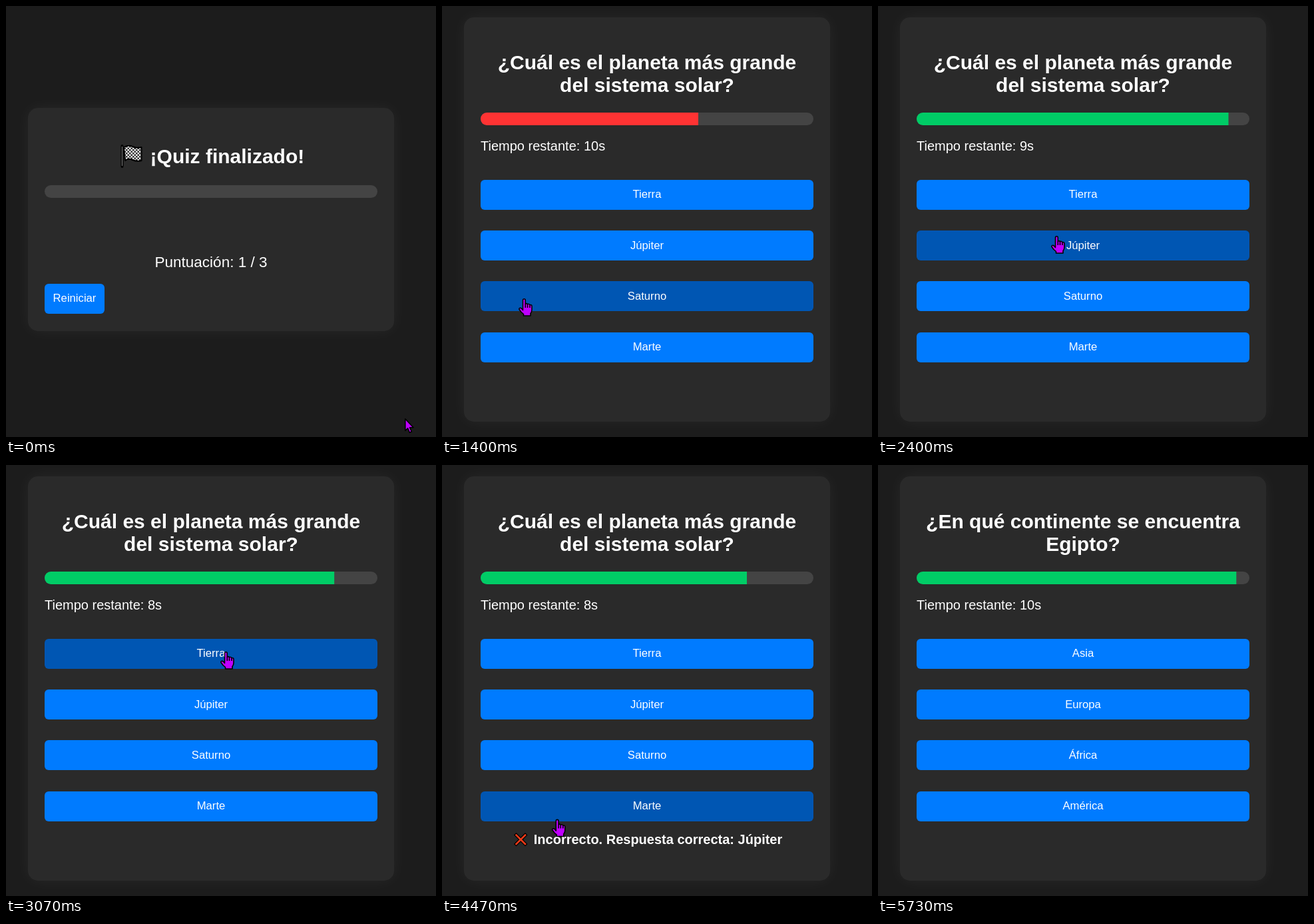
Recreate the animation shown at these times as an HTML page. Size 646x647 px, loop 5800 ms.

```html
<!DOCTYPE html>
<html lang="es">
<head>
<meta charset="utf-8">
<title>Quiz</title>
<style>
  html, body { margin: 0; width: 100%; height: 100%; overflow: hidden; background: #1c1c1c; }
  #card {
    position: absolute; left: 33px; width: 550px; border-radius: 15px;
    background: #2a2a2a; box-shadow: 0 0 25px rgba(255, 255, 255, .05);
  }
  svg { position: absolute; left: 0; top: 0; }
  text { font-family: "Liberation Sans", Arial, sans-serif; fill: #fff; }
  .mid { text-anchor: middle; }
  .title { font-size: 30px; font-weight: bold; }
  .label { font-size: 16.667px; text-anchor: middle; }
  .note { font-size: 20px; }
  .pointer { fill: #bf00ff; stroke: #000; stroke-width: 1.6; stroke-linejoin: round; }
</style>
</head>
<body>
<div id="card"></div>
<svg width="646" height="647" viewBox="0 0 646 647">
  <defs>
    <pattern id="checks" width="5" height="5" patternUnits="userSpaceOnUse">
      <rect width="5" height="5" fill="#f0f0f0"/>
      <path d="M0 0h2.5v5h2.5v-2.5h-5z" fill="#333"/>
    </pattern>
    <clipPath id="pill"><rect x="58" width="500" height="19" rx="9.5"/></clipPath>
  </defs>

  <g id="bar" clip-path="url(#pill)">
    <rect x="58" width="500" height="19" fill="#444"/>
    <rect id="fill" x="58" height="19"/>
  </g>

  <g id="end">
    <path d="M174.5 210V241" stroke="#000" stroke-width="4" stroke-linecap="round"/>
    <path d="M174.5 211V240" stroke="#777" stroke-width="1.2"/>
    <path d="M177 212Q184 208 190 211T203.500 212V232Q197 234 190 231T179 232Z"
      fill="url(#checks)" stroke="#000" stroke-width="2" stroke-linejoin="round"/>
    <text class="title" x="216.600" y="236">¡Quiz finalizado!</text>
    <text class="mid" x="308" y="392" font-size="22.5">Puntuación: 1 / 3</text>
  </g>

  <g id="quiz">
    <text id="line0" class="title mid" x="308" y="95"></text>
    <text id="line1" class="title mid" x="308" y="129"></text>
    <text id="time" class="note" x="58" y="217"></text>
  </g>

  <g id="buttons"></g>

  <g id="feedback">
    <g fill="none" stroke-linecap="square">
      <path d="M111.500 555.500L125 569M125 555.500L111.500 569" stroke="#000" stroke-width="5"/>
      <path d="M111.500 555.500L125 569M125 555.500L111.500 569" stroke="#f03a17" stroke-width="2.600"/>
    </g>
    <text class="note" x="137.800" y="569" font-weight="bold">Incorrecto. Respuesta correcta: Júpiter</text>
  </g>

  <g id="cursor" class="pointer">
    <path id="arrow" d="M.8 .8V18.500L4.600 14.800L7.300 21.300L10.300 20L7.600 13.700H13Z"/>
    <g id="hand">
      <path d="M-1.500 17.500V2.500Q-1.500 .8 .4 .8Q2.300 .8 2.300 2.500V8Q4 7 5.500 8.500Q7.500 7.700 9 9.500Q12 9 12 12V17Q12 20 10 22.500V26H-.5V23.500L-4 20.500L-7 16.500Q-7.500 14 -5 14.200Q-3 15 -1.500 17.500Z"/>
      <path d="M2.300 8V14M5.500 8.500V14M9 9.500V14" fill="none"/>
    </g>
  </g>
</svg>

<script>
const LOOP = 5800, FPS = 15;
const RESTART = 746, ANSWER = 3430, NEXT = 4930;
const $ = id => document.getElementById(id);
const smooth = u => u * u * (3 - 2 * u);

const questions = [
  { lines: ['¿Cuál es el planeta más grande', 'del sistema solar?'],
    options: ['Tierra', 'Júpiter', 'Saturno', 'Marte'] },
  { lines: ['¿En qué continente se encuentra', 'Egipto?'],
    options: ['Asia', 'Europa', 'África', 'América'] }
];

// [time, x, y, easing into this point]
const pointerPath = [
  [0, 599, 619], [600, 116, 440, smooth], [1000, 116, 440], [1333, 123, 439, smooth],
  [1933, 123, 439], [2400, 268, 345], [2533, 300, 284], [3067, 330, 280, smooth],
  [4200, 330, 280], [4333, 283, 354], [4467, 172.5, 532], [4667, 95, 680], [LOOP, 95, 680]
];

// [time, width], linear between points
const barPath = [
  [0, 0], [RESTART, 0], [RESTART + 1000, 500], [1770, 500], [3770, 400],
  [NEXT, 400], [NEXT + 1000, 500]
];

function sample(path, t) {
  const i = Math.max(1, path.findIndex(p => p[0] >= t));
  const a = path[i - 1], b = path[i];
  const ease = b[3] || (u => u);
  const u = ease((t - a[0]) / (b[0] - a[0]));
  return [1, 2].map(k => a[k] + (b[k] - a[k]) * u);
}

function makeButton(x, y, width, label, baseline) {
  const g = document.createElementNS('http://www.w3.org/2000/svg', 'g');
  g.innerHTML = `<rect x="${x}" y="${y}" width="${width}" height="45" rx="6"/>` +
    `<text class="label" x="${x + width / 2}" y="${baseline}">${label}</text>`;
  $('buttons').append(g);
  return { g, x, y, width, rect: g.firstChild, text: g.lastChild };
}

const restart = makeButton(58, 417, 90, 'Reiniciar', 444);
const options = [0, 1, 2, 3].map(i =>
  makeButton(58, Math.round(260.9 + 76.25 * i), 500, '', Math.round(288.4 + 76.25 * i)));

const show = (el, on) => { el.style.display = on ? '' : 'none'; };

function draw(t) {
  const ended = t < RESTART;
  const question = questions[t < NEXT ? 0 : 1];
  const seconds = t >= NEXT || t < 1770 ? 10 : t < 2770 ? 9 : 8;

  $('card').style.top = (ended ? 153 : 17) + 'px';
  $('card').style.height = (ended ? 335 : 607) + 'px';
  show($('end'), ended);
  show($('quiz'), !ended);
  show($('feedback'), t >= ANSWER && t < NEXT);
  question.lines.forEach((line, i) => { $('line' + i).textContent = line; });
  $('time').textContent = `Tiempo restante: ${seconds}s`;

  $('bar').setAttribute('transform', `translate(0 ${ended ? 269 : 160})`);
  $('fill').setAttribute('width', sample(barPath, t)[0]);
  $('fill').setAttribute('fill', t < 1770 ? '#ff3333' : '#00cc66');

  const [x, y] = sample(pointerPath, t);
  let hovering = false;
  [restart, ...options].forEach((b, i) => {
    const visible = ended === (b === restart);
    const over = visible && x >= b.x && x < b.x + b.width && y >= b.y && y < b.y + 45;
    hovering = hovering || over;
    show(b.g, visible);
    b.rect.setAttribute('fill', over ? '#0056b3' : '#007bff');
    if (i) b.text.textContent = question.options[i - 1];
  });
  show($('hand'), hovering);
  show($('arrow'), !hovering);
  $('cursor').setAttribute('transform', `translate(${x} ${y})`);
}

function tick() {
  const ticks = Math.floor(performance.now() % LOOP / 10);
  draw(Math.floor(ticks * FPS / 100 + 0.051) * 1000 / FPS);
  requestAnimationFrame(tick);
}
tick();
</script>
</body>
</html>
```
